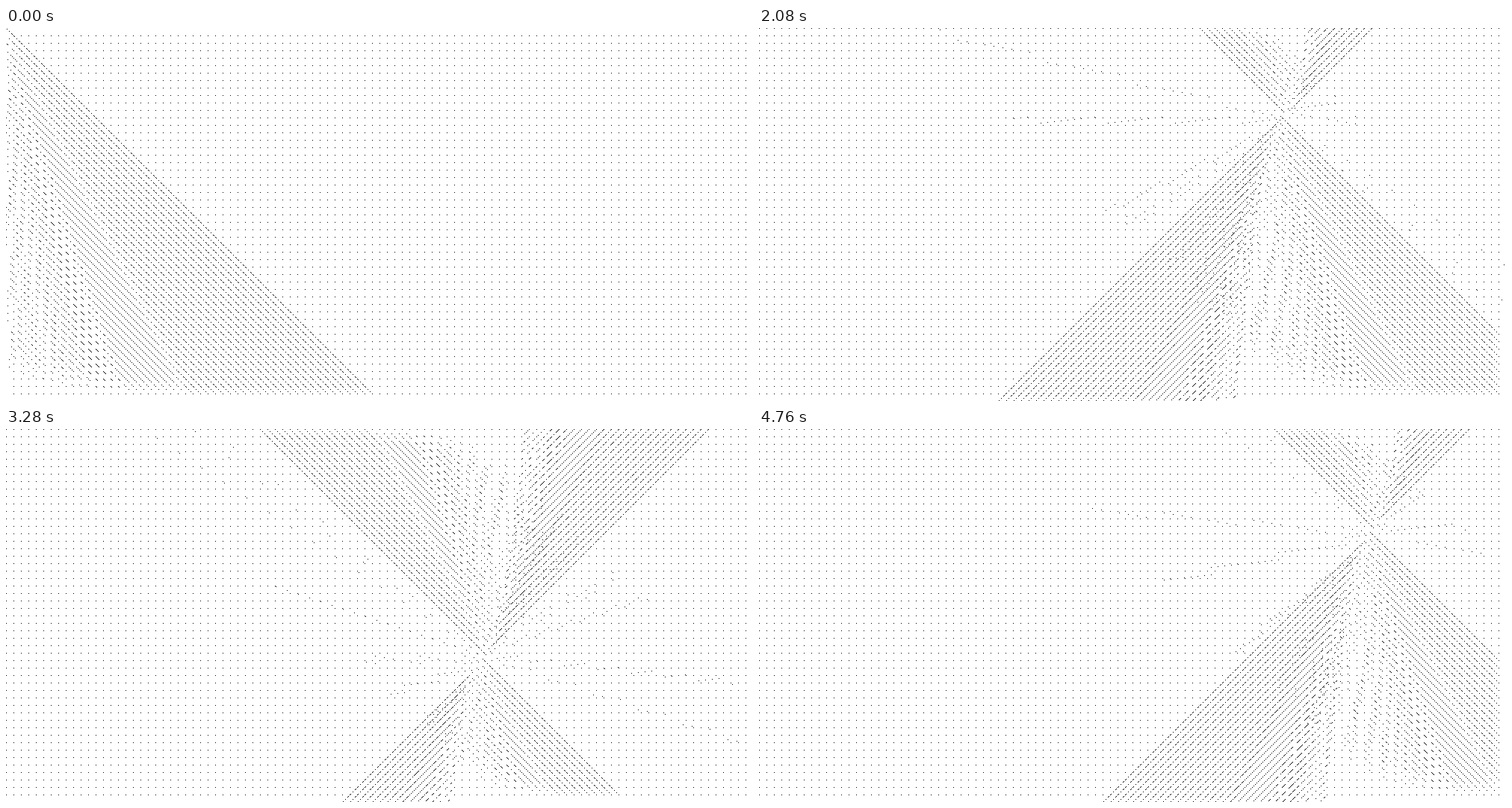
Animation of 1000 by 500 pixels, one loop 4800 ms. Source, as an HTML page with a canvas:

```html
<!DOCTYPE html>
<html lang="en">
<head>
<meta charset="utf-8">
<title>Pointer field</title>
<style>
html, body { margin: 0; width: 100%; height: 100%; overflow: hidden; background: #fff; }
canvas { display: block; width: 1000px; height: 500px; }
</style>
</head>
<body>
<canvas id="stage" width="1000" height="500"></canvas>
<script>
const W = 1000, H = 500, CELL = 10, DOTS = 5, GAP = 3;
const STEP = 40, LOOP = 4800;
const ctx = document.getElementById('stage').getContext('2d');
const image = ctx.createImageData(W, H);
const pixels = new Uint32Array(image.data.buffer);

// Focus path: time, x, y
const path = [
  [360, 300, 160], [800, 429, 195], [1520, 581, 440], [2080, 701, 119],
  [2760, 341, 385], [3140, 710, 330], [3760, 219, 214], [4200, 700, 310],
  [4760, 819, 135]
];

function spline(a, b, c, d, u) {
  return b + u / 2 * (c - a + u * (2 * a - 5 * b + 4 * c - d + u * (3 * (b - c) + d - a)));
}

function focusAt(t) {
  if (t < STEP) return [0, 0];
  const last = path.length - 1;
  const key = k => path[Math.max(0, Math.min(last, k))];
  let i = 0;
  while (i < last - 1 && t >= path[i + 1][0]) i++;
  const u = Math.max(0, Math.min(1, (t - path[i][0]) / (path[i + 1][0] - path[i][0])));
  return [1, 2].map(n =>
    Math.round(spline(key(i - 1)[n], key(i)[n], key(i + 1)[n], key(i + 2)[n], u)));
}

function dot(x, y) {
  if (x >= 0 && x < W && y >= 0 && y < H) pixels[y * W + x] = 0xff000000;
}

// Whole-number slope sets the spacing: shallow cells collapse to one dot,
// nearly vertical ones scatter far along the diagonal and form rays.
function drawCell(gx, gy, cx, cy) {
  const dx = gx - cx, dy = gy - cy;
  if (dx === 0 || dy === 0) return;
  const spacing = GAP * Math.floor(Math.abs(dy / dx));
  const stepX = -Math.sign(dy) * spacing;
  const stepY = -Math.sign(dx) * spacing;
  for (let i = 0; i < DOTS; i++) dot(gx + i * stepX, gy + i * stepY);
}

function draw(t) {
  const [cx, cy] = focusAt(t);
  pixels.fill(0xffffffff);
  for (let y = 0; y < H; y += CELL)
    for (let x = 0; x < W; x += CELL) drawCell(x, y, cx, cy);
  ctx.putImageData(image, 0, 0);
}

const start = performance.now();
let shown = -1;
function tick() {
  const elapsed = (performance.now() - start) % LOOP;
  const t = Math.floor(elapsed / STEP) * STEP;
  if (t !== shown) draw(shown = t);
  requestAnimationFrame(tick);
}
tick();
</script>
</body>
</html>
```
